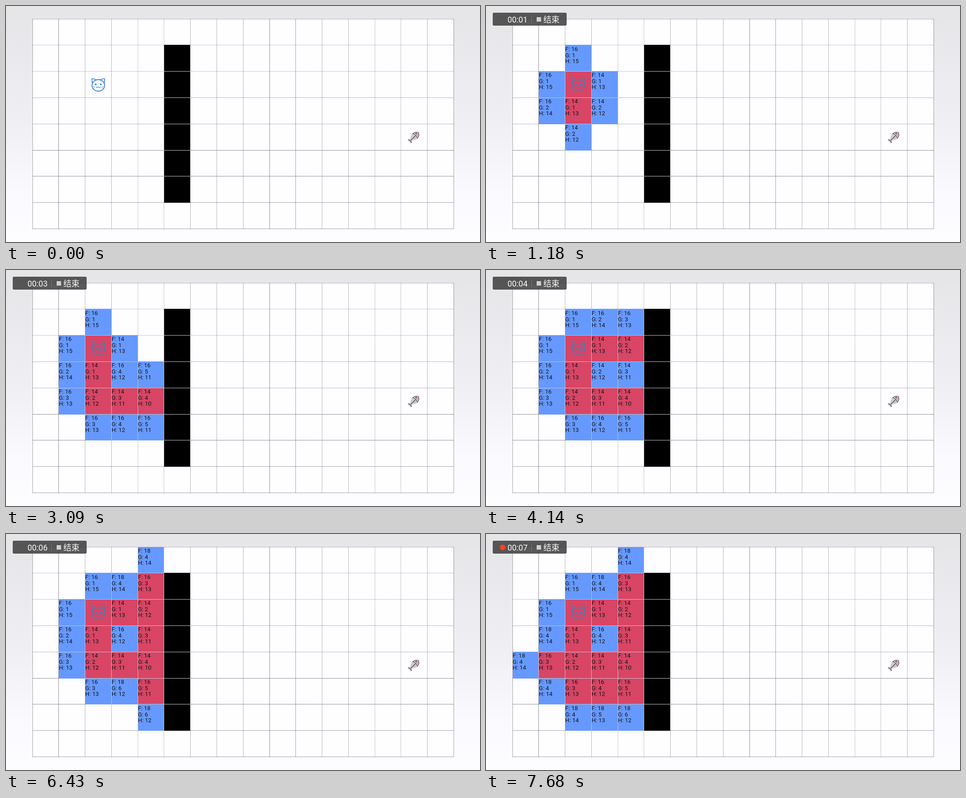
Write an HTML page with a canvas that moves like this. It is 1058x529 px and loops after 8 s.

```html
<!DOCTYPE html>
<html lang="zh">
<head>
<meta charset="utf-8">
<title>A* search</title>
<style>
  html, body { margin: 0; width: 100%; height: 100%; overflow: hidden; }
  canvas { display: block; width: 1058px; height: 529px; }
</style>
</head>
<body>
<canvas id="stage" width="1058" height="529"></canvas>
<script>
const ctx = document.getElementById('stage').getContext('2d');
const LOOP = 8000, COLS = 16, ROWS = 8, PITCH = 58.78, LEFT = 59, TOP = 29.2;
const FIRST_STEP = 385, STEP = 605, STEP_COUNT = 13;
const START = { x: 2, y: 2 }, GOAL = { x: 14, y: 4 };
const V_TONES = '56443344465443345', H_TONES = '433446655';
const DOT_ON = [0, 1600, 2630, 3530, 4640, 5640, 6680, 7630];
const BLACK = '#000', BLUE = '#6699ff', RED = '#d84565', SEAM = '#c3c6cd';

const lineX = i => Math.floor(LEFT + PITCH * i);
const lineY = j => Math.floor(TOP + PITCH * j);
const isWall = (x, y) => x === 5 && y >= 1 && y <= 6;

// A* where open neighbours are always re-scored and the newest node wins ties.
function search(count) {
  const nodes = new Map();
  const add = (x, y, g) => {
    const h = Math.abs(GOAL.x - x) + Math.abs(GOAL.y - y);
    nodes.set(x + ',' + y, { x, y, g, h, closed: false });
  };
  const snapshots = [[]];
  add(START.x, START.y, 0);
  for (let i = 0; i < count; i++) {
    const best = [...nodes.values()].filter(n => !n.closed)
      .reduce((a, b) => (b.g + b.h <= a.g + a.h ? b : a));
    best.closed = true;
    for (const [dx, dy] of [[0, -1], [-1, 0], [1, 0], [0, 1]]) {
      const x = best.x + dx, y = best.y + dy;
      if (x < 0 || y < 0 || x >= COLS || y >= ROWS || isWall(x, y)) continue;
      const known = nodes.get(x + ',' + y);
      if (!known) add(x, y, best.g + 1);
      else if (!known.closed) known.g = best.g + 1;
    }
    snapshots.push([...nodes.values()].map(n => ({ ...n })));
  }
  return snapshots;
}
const snapshots = search(STEP_COUNT);
const wall = Array.from({ length: 6 }, (_, i) => ({ x: 5, y: i + 1, color: BLACK }));

function drawBackground() {
  const sky = ctx.createLinearGradient(0, 0, 0, 529);
  sky.addColorStop(0, '#e5e4e7');
  sky.addColorStop(0.5, '#f0eff3');
  sky.addColorStop(0.78, '#faf9fd');
  sky.addColorStop(1, '#fdfcff');
  ctx.fillStyle = sky;
  ctx.fillRect(0, 0, 1058, 529);

  const left = lineX(0), top = lineY(0), right = lineX(COLS), bottom = lineY(ROWS);
  ctx.fillStyle = '#fefdff';
  ctx.fillRect(left, top, right - left, bottom - top);
  const tone = digit => { ctx.fillStyle = `rgba(70,70,74,${digit / 10})`; };
  for (let i = 0; i <= COLS; i++) {
    tone(V_TONES[i]);
    ctx.fillRect(lineX(i), top, 1, bottom - top + 1);
  }
  for (let j = 0; j <= ROWS; j++) {
    tone(H_TONES[j]);
    ctx.fillRect(left, lineY(j), right - left + 1, 1);
  }
}

// Fills cover the outer horizontal rules; light seams separate filled neighbours.
function drawCells(cells) {
  const filled = new Set(cells.map(c => c.x + ',' + c.y));
  for (const { x, y, color } of cells) {
    ctx.fillStyle = color;
    ctx.fillRect(lineX(x) + 1, lineY(y), lineX(x + 1) - lineX(x) - 1, lineY(y + 1) - lineY(y) + 1);
  }
  ctx.fillStyle = SEAM;
  for (const { x, y } of cells) {
    const l = lineX(x), t = lineY(y);
    if (filled.has(x + ',' + (y - 1))) ctx.fillRect(l, t, lineX(x + 1) - l + 1, 1);
    if (filled.has((x - 1) + ',' + y)) ctx.fillRect(l, t, 1, lineY(y + 1) - t + 1);
  }
}

function drawScores(n) {
  if (n.x === START.x && n.y === START.y) return;
  const x = LEFT + PITCH * n.x + 0.3, y = Math.floor(TOP + PITCH * n.y + 13.2);
  ctx.fillStyle = '#111318';
  ctx.font = '13px Roboto, sans-serif';
  ctx.fillText(`F: ${n.g + n.h}`, x, y);
  ctx.fillText(`G: ${n.g}`, x, y + 14);
  ctx.fillText(`H: ${n.h}`, x, y + 27);
}

function strokePath(d, color, width) {
  ctx.strokeStyle = color;
  ctx.lineWidth = width;
  ctx.stroke(new Path2D(d));
}

function disc(x, y, r, color) {
  ctx.fillStyle = color;
  ctx.beginPath();
  ctx.arc(x, y, r, 0, Math.PI * 2);
  ctx.fill();
}

function drawCat(onRed) {
  const blue = onRed ? '#3f7fb8' : '#2f7be0';
  ctx.save();
  ctx.translate(206, 177);
  ctx.lineCap = ctx.lineJoin = 'round';
  strokePath('M-14 1 A14 13 0 0 1 14 1 A14 13 0 0 1-14 1 Z', blue, 1.8);
  strokePath('M-13.5-4 L-14.2-14 Q-9-14.5-5-11.5 M13.5-4 L14.2-14 Q9-14.5 5-11.5', blue, 1.6);
  strokePath('M-4.6 4.4 Q-3 7.4-1.5 5 Q0 3.6 1.5 5 Q3 7.4 4.6 4.4', blue, 1.2);
  strokePath('M-11 3.5 L-8.5 4 M-10 6.8 L-8 6.2 M11 3.5 L8.5 4 M10 6.8 L8 6.2', blue, 1);
  disc(-5.7, -1.3, 1.9, blue);
  disc(5.7, -1.3, 1.9, blue);
  ctx.restore();
}

function drawFish() {
  const ink = '#4a4145', flesh = '#cdb0b3';
  const shape = d => {
    ctx.fillStyle = flesh;
    ctx.fill(new Path2D(d));
    strokePath(d, ink, 1);
  };
  ctx.save();
  ctx.translate(911, 293.5);
  ctx.rotate(-Math.PI / 4);
  ctx.lineJoin = ctx.lineCap = 'round';
  strokePath('M-10 0 H4', ink, 1.3);
  strokePath('M-7.5-3 L-6.5 3 M-5-5 L-4 5 M-2.3-6.5 L-1.3 6.5 M.4-7.2 L1.4 7.2', ink, 0.9);
  shape('M3-7.3 Q10-7.5 14 0 Q10 7.5 3 7.3 Q5.5 0 3-7.3 Z');
  shape('M-9.5 0 L-14-5 L-13 0 L-14 5 Z');
  disc(8.5, -2, 1.4, ink);
  ctx.restore();
}

function drawRecorder(t) {
  const second = Math.max(0, Math.floor((t - 10) / 1000));
  const dotOff = second * 1000 + 65;
  const dotVisible = t < dotOff || t >= DOT_ON[second];
  ctx.save();
  ctx.globalAlpha = Math.min(1, Math.max(0, (t - 65) / 330));
  ctx.fillStyle = 'rgba(62,62,62,0.86)';
  ctx.beginPath();
  ctx.roundRect(15, 15, 165, 29, 3);
  ctx.fill();
  if (dotVisible) disc(37.2, 30, 6.2, '#fb4226');
  ctx.fillStyle = '#777';
  ctx.fillRect(101, 22, 1, 16);
  ctx.fillStyle = '#cfcfcf';
  ctx.fillRect(113, 25, 10, 10);
  ctx.fillStyle = '#fafafa';
  ctx.font = '18px Roboto, sans-serif';
  ctx.fillText(`00:0${second}`, 48, 36.5);
  ctx.font = '18px "Noto Sans CJK SC", "Noto Sans CJK", sans-serif';
  ctx.fillText('结束', 128, 37);
  ctx.restore();
}

function draw(t) {
  const step = Math.max(0, Math.floor((t - FIRST_STEP) / STEP) + 1);
  const nodes = snapshots[Math.min(step, STEP_COUNT)];
  drawBackground();
  drawCells([...wall, ...nodes.map(n => ({ ...n, color: n.closed ? RED : BLUE }))]);
  nodes.forEach(drawScores);
  drawCat(step > 0);
  drawFish();
  drawRecorder(t);
}

const origin = performance.now();
function tick() {
  draw((performance.now() - origin) % LOOP);
  requestAnimationFrame(tick);
}
tick();
</script>
</body>
</html>
```
